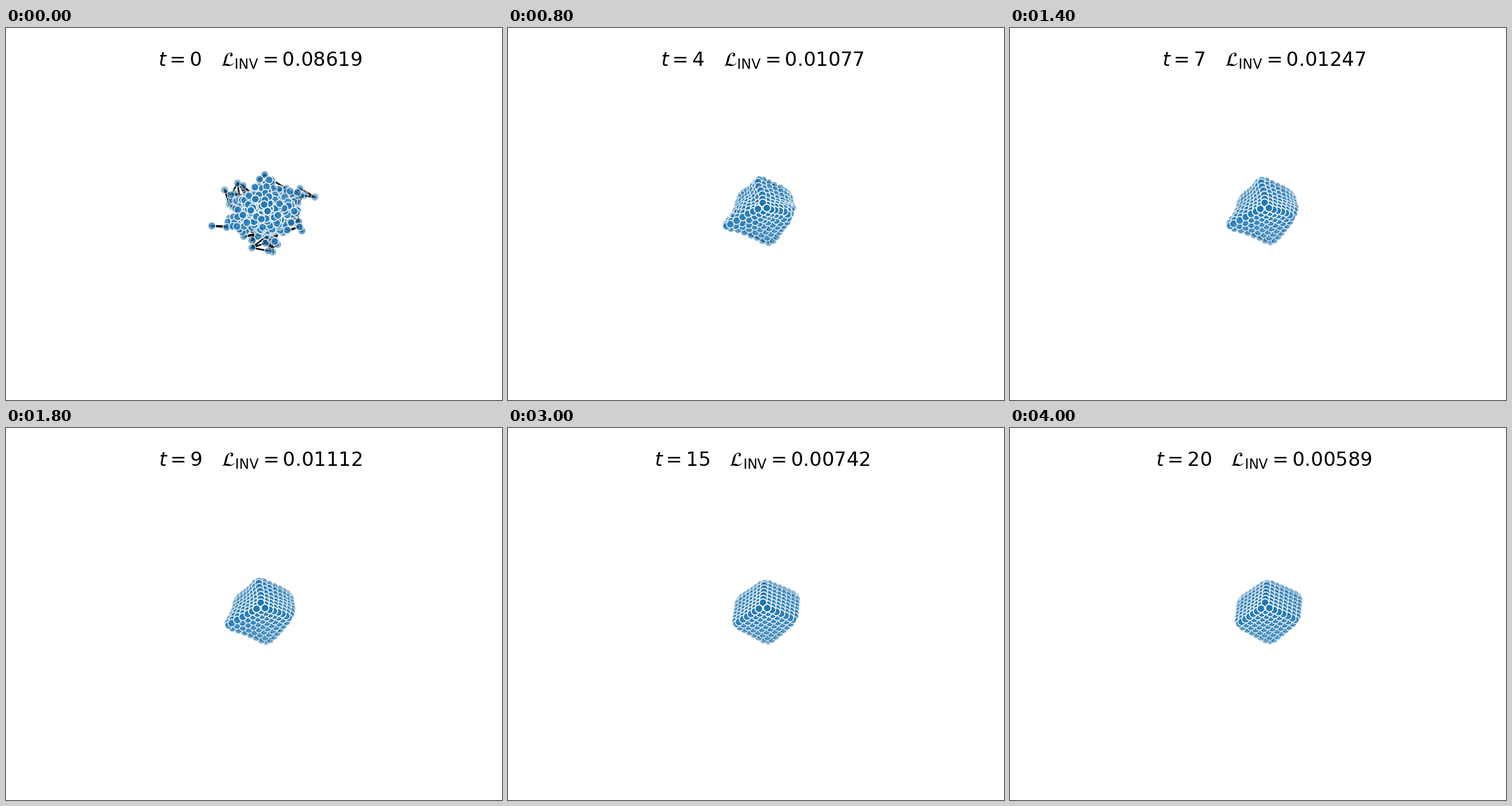
These frames come from a looping animation (864 px wide and 648 px high, 4.2 s). A matplotlib script:

```python
import numpy as np
import matplotlib.pyplot as plt
from matplotlib.animation import FuncAnimation
from matplotlib.collections import LineCollection
from matplotlib.colors import to_rgb

WIDTH, HEIGHT, DPI = 864, 648, 135
STEPS, INTERVAL = 21, 200
N = 8
BLUE, WHITE = to_rgb("tab:blue"), (1, 1, 1)

# Loss at a few key steps; the rest follows on a log scale.
LOSS_KEYS = {0: 0.08619, 2: 0.01453, 4: 0.01077, 7: 0.01247, 9: 0.01112,
             12: 0.00891, 15: 0.00742, 20: 0.00589}

# The cube's near corner and its three edges as x, y, depth.
FRONT = np.array([444, 310, 0])
EDGES = np.array([[-47, 32, 39], [56, 25, 36], [4, -42, 48]])

# Corners that are dragged out of shape before the cube settles.
PULLS = {(1, 0, 0): (-20, 4), (0, 1, 0): (-6, -7),
         (0, 0, 1): (-12, -8), (0, 1, 1): (-14, -1)}

unit = np.stack(np.meshgrid(*[np.linspace(0, 1, N)] * 3, indexing="ij"),
                axis=-1)


def build_cube():
    """Resting x, y and depth of every node, with blunted corners."""
    cube = FRONT + unit @ EDGES
    cube[..., 1] += 6 * unit[..., 0] * unit[..., 1]
    center = cube.mean(axis=(0, 1, 2))
    is_corner = np.all((unit == 0) | (unit == 1), axis=-1)[..., None]
    return cube + is_corner * (center - cube) * [0.05, 0.05, 0.13]


def build_pull():
    pull = np.zeros((N, N, N, 3))
    for corner, xy in PULLS.items():
        dist2 = ((unit - corner) ** 2).sum(axis=-1)
        pull[..., :2] += np.exp(-5 * dist2)[..., None] * np.array(xy)
    return pull


def build_fling(cube):
    """Outward throw, strongest at the corners."""
    reach = np.abs(2 * unit - 1).prod(axis=-1, keepdims=True) ** 2
    return reach * (cube - cube.mean(axis=(0, 1, 2))) * [0.65, 0.3, 0]


def smooth(field):
    """Average each node with its six lattice neighbours."""
    p = np.pad(field, [(1, 1)] * 3 + [(0, 0)], mode="edge")
    c = slice(1, -1)
    return (field + p[:-2, c, c] + p[2:, c, c] + p[c, :-2, c]
            + p[c, 2:, c] + p[c, c, :-2] + p[c, c, 2:]) / 7


def pull_amount(t):
    return (1 - np.exp(-t)) / (1 + np.exp((t - 9.7) / 2))


def build_path():
    cube, pull = build_cube(), build_pull()
    fling = build_fling(cube)
    noise = np.random.default_rng(5).normal(0, 7.5, cube.shape)
    path = []
    for t in range(STEPS):
        points = (cube + pull_amount(t) * pull + np.exp(-1.2 * t) * fling
                  + noise)
        path.append(points.reshape(-1, 3))
        noise = 0.95 * (0.25 * noise + 0.75 * smooth(noise))
    return path


def build_links():
    ids = np.arange(N ** 3).reshape(N, N, N)
    pairs = [(ids[:-1], ids[1:]), (ids[:, :-1], ids[:, 1:]),
             (ids[..., :-1], ids[..., 1:])]
    return np.concatenate([np.stack([a.ravel(), b.ravel()], 1)
                           for a, b in pairs])


def loss(t):
    return np.exp(np.interp(t, list(LOSS_KEYS),
                            np.log(list(LOSS_KEYS.values()))))


def shade(rgb, alpha):
    return np.column_stack([np.tile(rgb, (len(alpha), 1)), alpha])


path = build_path()
link_ids = build_links()

fig = plt.figure(figsize=(WIDTH / DPI, HEIGHT / DPI), dpi=DPI,
                 facecolor="white")
ax = fig.add_axes([0, 0, 1, 1])
ax.set(xlim=(0, WIDTH), ylim=(HEIGHT, 0))
ax.axis("off")

links = LineCollection([], colors="black", linewidths=1.5, zorder=1,
                       capstyle="projecting")
ax.add_collection(links)
nodes = ax.scatter(path[0][:, 0], path[0][:, 1], s=50, linewidths=1, zorder=2)
title = fig.text(0.5125, 0.88 + 6 * DPI / 72 / HEIGHT, "", fontsize=18,
                 ha="center", va="baseline", color="black")


def update(t):
    points = path[t]
    links.set_segments(points[link_ids][..., :2])
    # Far nodes come first and fade, as in a depth-shaded scatter.
    ordered = points[np.argsort(-points[:, 2])]
    depth = ordered[:, 2]
    alpha = 1 - 0.7 * (depth - depth.min()) / np.ptp(depth)
    nodes.set_offsets(ordered[:, :2])
    nodes.set_facecolor(shade(BLUE, alpha))
    nodes.set_edgecolor(shade(WHITE, alpha))
    title.set_text(rf"$t={t} \quad \mathcal{{L}}_{{\mathrm{{INV}}}}"
                   rf"={loss(t):.5f}$")
    return links, nodes, title


anim = FuncAnimation(fig, update, frames=STEPS, interval=INTERVAL,
                     repeat=True, repeat_delay=0)
plt.show()
```
